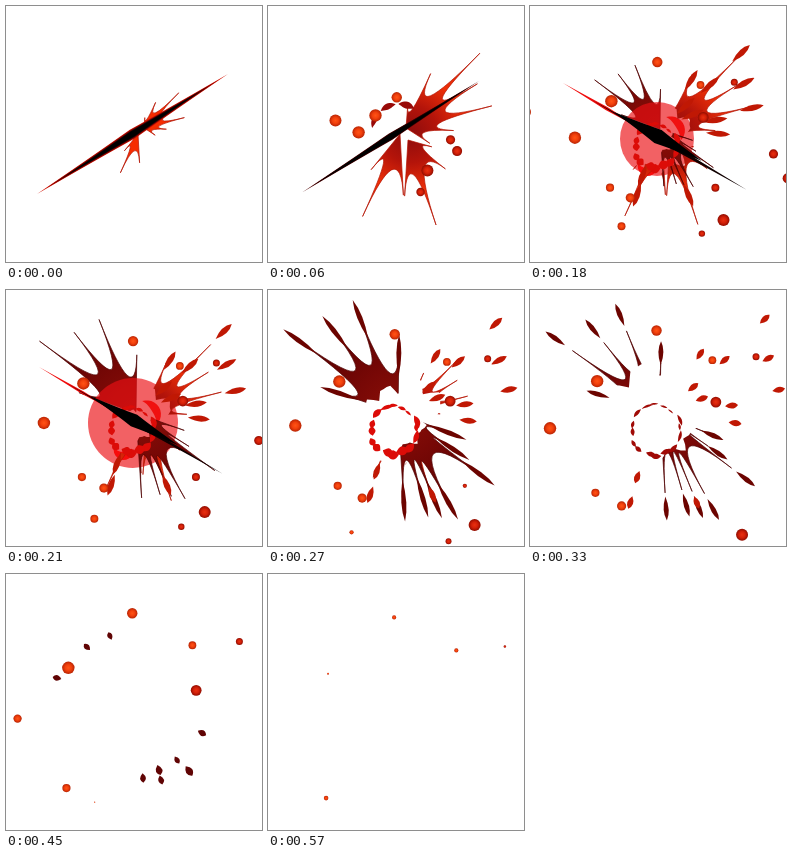
An HTML page with a canvas that plays this animation: 256 px wide and 256 px high, repeating every 600 ms.

```html
<!DOCTYPE html>
<html lang="en">
<head>
<meta charset="utf-8">
<title>Slash splatter</title>
<style>
html, body { margin: 0; width: 100%; height: 100%; overflow: hidden; background: #fff; }
canvas { display: block; width: 256px; height: 256px; }
</style>
</head>
<body>
<canvas id="stage" width="256" height="256"></canvas>
<script>
const g = document.getElementById('stage').getContext('2d');
const LOOP = 600, STEP = 30, OX = 130, OY = 123;
const start = performance.now();

const clamp = (v, lo = 0, hi = 1) => Math.min(hi, Math.max(lo, v));
const mix = (a, b, u) => a + (b - a) * u;

function seeded(seed) {
  return () => (seed = seed * 16807 % 2147483647) / 2147483647;
}

function radial(x, y, r, ...stops) {
  const p = g.createRadialGradient(x, y, 0, x, y, r);
  stops.forEach((c, i) => p.addColorStop(i / (stops.length - 1), c));
  return p;
}
const bright = radial(142, 128, 115, '#8c0c0c', '#b4140a', '#ee3008', '#dc2404', '#c01400');
const ruby = radial(OX, OY, 130, '#d81a08', '#cc1c06', '#c01804');
const dark = radial(OX, OY, 135, '#8c1008', '#780806', '#600202', '#6c0400');

function paint(fill, edge) {
  g.fillStyle = fill;
  g.fill();
  if (!edge) return;
  g.strokeStyle = edge;
  g.lineWidth = 0.7;
  g.stroke();
}

// Flight from the origin, slowed by drag and pulled down by gravity
function fly(dx, dy, t) {
  const e = 1 - Math.exp(-t / 160);
  return [OX + dx * e, OY + dy * e + 60 * (t / 1000) ** 2];
}

// Leaf shape centred on x, y and pointing away from the origin
function leaf(x, y, half, w, fill) {
  const a = Math.atan2(y - OY, x - OX);
  g.save();
  g.translate(x, y);
  g.rotate(a);
  g.beginPath();
  g.moveTo(-half, 0);
  g.quadraticCurveTo(half * 0.2, w, half, 0);
  g.quadraticCurveTo(half * 0.2, -w, -half, 0);
  paint(fill);
  g.restore();
}

// Fan of spikes around cx, cy, eaten away from inside by a wavy hole
function fan(cx, cy, tips, hole, fill, edge) {
  g.save();
  if (hole > 0) {
    g.beginPath();
    g.rect(0, 0, 256, 256);
    for (let i = 0; i <= 60; i++) {
      const a = i / 60 * 2 * Math.PI;
      const r = hole * (1 + 0.12 * Math.sin(9 * a) + 0.06 * Math.sin(17 * a));
      g[i ? 'lineTo' : 'moveTo'](OX + r * Math.cos(a), 132 + r * Math.sin(a));
    }
    g.clip('evenodd');
  }
  g.beginPath();
  g.moveTo(cx, cy);
  tips.forEach(([x, y], i) => i ? g.quadraticCurveTo(cx, cy, x, y) : g.lineTo(x, y));
  g.closePath();
  paint(fill, edge);
  g.restore();
}

// First splash: bursts out until 120 ms, then draws back
const brightFans = [
  { born: 0, c: [138, 122], tips: [[140, 96], [167, 58], [225, 34], [222, 70], [239, 96], [194, 125], [166, 140]] },
  { born: 0, c: [132, 128], tips: [[136, 200], [88, 225], [98, 170]] },
  { born: 30, c: [140, 134], tips: [[168, 142], [184, 168], [173, 234], [136, 200]] }
];

function drawBright(t) {
  if (t > 285) return;
  const reach = t < 120 ? 1 - 0.6 * (1 - t / 120) ** 2 : 1 - (t - 120) * 0.0026;
  const hole = t < 165 ? 0 : 36 + (t - 210) * 0.15;
  for (const { born, c, tips } of brightFans) {
    if (t < born) continue;
    const ends = tips.map(([x, y]) => [mix(c[0], x, reach), mix(c[1], y, reach)]);
    fan(...c, ends, hole, t ? bright : '#f62c00', '#b41200');
  }
}

// Second splash: spikes that fly on as separate leaves
const darkFans = [
  { hole: 34, grow: 0.37, dirs: [[-71, -29], [-120, -93], [-77, -104], [-46, -120], [1, -76]] },
  { hole: 25, grow: 0.13, dirs: [[60, 18], [66, 38], [98, 68], [61, 103], [44, 100], [30, 98], [7, 102]] }
];

function drawDark({ hole, grow, dirs }, t) {
  if (t < 150 || t > 400) return;
  const ends = dirs.map(d => fly(...d, t));
  const reach = 1.1 * clamp(0.4 + (t - 150) / 90) * (1 - Math.max(0, t - 270) * 0.004);
  if (t < 375) {
    const tips = ends.map(([x, y]) => [mix(OX, x, reach), mix(OY, y, reach)]);
    fan(OX, OY, tips, Math.max(0, hole + (t - 270) * grow), dark, '#500000');
  }
  if (t > 255) {
    const half = 12 - (t - 330) * 0.15;
    ends.forEach(([x, y]) => leaf(x, y, half, clamp(half / 2, 2, 5), dark));
  }
}

// Red flecks torn off the first splash
const flecks = [
  [120, -115], [136, -34], [46, -75], [124, -70], [74, -68], [38, -37],
  [48, -24], [82, -16], [86, 4], [-34, 95], [42, 95], [-26, 66]
];

function drawFlecks(t) {
  if (t < 180 || t > 390) return;
  const half = 11 - (t - 210) * 0.0375;
  const w = 6 * clamp((420 - t) / 80);
  flecks.forEach(f => leaf(...fly(...f, t), half, w, ruby));
}

// Dark leftovers, by their places at 450 ms
const drops = [
  [104, 62], [81, 73], [51, 104], [196, 159], [171, 186], [183, 197], [153, 196], [155, 206], [137, 204]
];

function drawDrops(t) {
  if (t < 375 || t > 510) return;
  const rnd = seeded(77), out = 1 + (t - 450) / 1500;
  for (const [x, y] of drops) {
    const r = (3.4 + 1.6 * rnd()) * clamp((530 - t) / 80);
    const stretch = 1.2 + clamp((450 - t) / 75);
    leaf(mix(OX, x, out), mix(OY, y, out), r * stretch, r * 1.5, '#600404');
  }
}

// Balls: flight direction, radius, time of vanishing and of appearing
const balls = [
  [-4, -102, 5.2, 600], [-72, -44, 6.2, 582], [-126, 10, 6.2, 500], [-200, -28, 6, 300],
  [94, 132, 6, 460], [168, 34, 4.6, 300], [189, 70, 5, 300], [72, 201, 4.2, 300],
  [-74, 84, 4.1, 612, 150], [-44, 99, 4.6, 460, 180], [-57, 141, 4, 310, 150],
  [62, 152, 3.2, 340, 150], [82, 84, 4, 310, 150],
  [110, -72, 3.5, 596, 150], [60, -68, 3.9, 610, 150], [64, -20, 5.4, 540, 180]
];

function drawBall([dx, dy, size, end, born = 60], t) {
  if (t < born || t >= end) return;
  const [x, y] = fly(dx, dy, t);
  const r = size * clamp((end - t) / 75);
  g.beginPath();
  g.arc(x, y, r, 0, 7);
  paint(dx < 62 ? radial(x, y, r, '#ff5416', '#f2400c', '#b82404')
                : radial(x, y, r, '#e83010', '#d42008', '#900c00'));
}

function arcBlob(x, y, r, from, to, w, fill) {
  const n = 12;
  g.beginPath();
  for (let i = 0; i <= 2 * n; i++) {
    const side = i <= n ? 1 : -1, u = side > 0 ? i / n : 2 - i / n;
    const d = r + side * w / 2 * Math.sin(u * Math.PI), a = mix(from, to, u);
    g.lineTo(x + d * Math.cos(a), y + d * Math.sin(a));
  }
  paint(fill);
}

// Ragged ring of short blobs, heavier towards its lower side
function drawRing(t) {
  if (t >= 60 && t <= 150) {
    for (let i = 0; i < 3; i++) {
      const a = 3.25 + i * 0.72;
      arcBlob(131, 125, 22 + t / 12, a, a + 0.62, 5 + i, '#980a08');
    }
  }
  if (t < 180 || t > 390) return;
  const rnd = seeded(4242), count = 16;
  const fade = clamp(1 - (t - 285) / 105);
  for (let i = 0; i < count; i++) {
    const a = i / count * 2 * Math.PI + 0.2 * rnd();
    const span = (0.3 + 0.3 * rnd()) * mix(0.6, 1, fade);
    const w = (4.5 + 2.5 * Math.sin(a) + 3 * rnd()) * fade;
    arcBlob(126, 140, 21 + 4 * rnd() + (t - 270) / 40, a, a + span, w, t < 300 ? '#dc0c08' : '#a00a06');
  }
}

function drawFlash(t) {
  if (t < 180 || t > 240) return;
  g.beginPath();
  g.arc(127, 133, t < 210 ? 37 : 45, 0, 7);
  paint(`rgba(236,16,20,${t > 210 ? 0.25 : 0.66})`);
  if (t > 210) return;
  arcBlob(135, 128, 17, -1.5, 0.4, 8, '#f01010');
  arcBlob(118, 156, 10, 0.3, 3, 8, '#f80c0c');
}

// Thin blade, widest in the middle, with hollow edges
function blade(x1, y1, x2, y2, w, fill) {
  const len = Math.hypot(x2 - x1, y2 - y1);
  g.save();
  g.translate((x1 + x2) / 2, (y1 + y2) / 2);
  g.rotate(Math.atan2(y2 - y1, x2 - x1));
  g.beginPath();
  g.moveTo(-len / 2, 0);
  for (const s of [1, -1]) {
    g.quadraticCurveTo(-s * len / 5, -s * w * 0.25, 0, -s * w / 2);
    g.quadraticCurveTo(s * len / 5, -s * w * 0.25, s * len / 2, 0);
  }
  paint(fill);
  g.restore();
}

function drawCuts(t) {
  if (t <= 150) {
    const u = t / 120;
    const ends = [mix(31, 37, u), mix(188, 185, u), mix(222, 200, u), mix(68, 82, u)];
    const mid = [(ends[0] + ends[2]) / 2, (ends[1] + ends[3]) / 2];
    const layers = t < 60 ? ['#d01000', '#800400', '#300000', '#000'] : ['#500000', '#200000', '#000'];
    layers.forEach((c, i) => {
      const p = ends.map((v, k) => mix(v, mid[k % 2], i * 0.1));
      blade(...p, mix(10, 4, u) * (1 - i * 0.14), c);
    });
  }
  if (t >= 150 && t <= 240) {
    const w = t > 210 ? 0.35 : 1 + (210 - t) / 200;
    blade(33, 77, 120, 128, 3 * w, '#f00c0c');
    blade(62, 94, 217, 184, 4 * w, '#100000');
    blade(84, 106, 172, 155, 13 * w, '#000');
  }
}

function frame() {
  const t = Math.floor((performance.now() - start) % LOOP / STEP) * STEP;
  g.fillStyle = '#fff';
  g.fillRect(0, 0, 256, 256);
  drawDark(darkFans[0], t);
  drawFlash(t);
  drawBright(t);
  drawDark(darkFans[1], t);
  drawFlecks(t);
  drawDrops(t);
  drawRing(t);
  balls.forEach(b => drawBall(b, t));
  drawCuts(t);
  requestAnimationFrame(frame);
}
frame();
</script>
</body>
</html>
```
